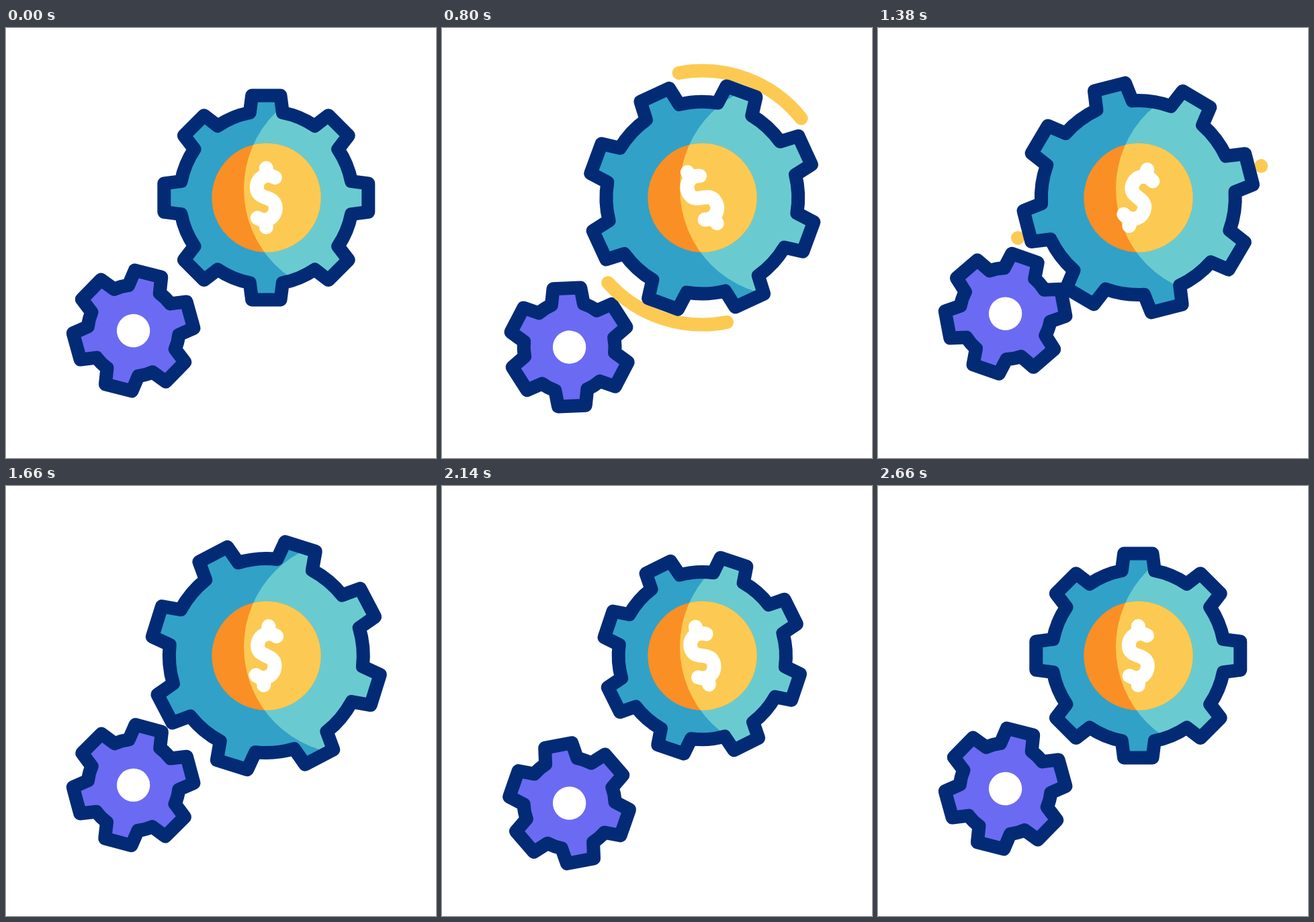
Recreate the animation shown at these times as an HTML page with a canvas. Size 640 by 640 pixels, loop 3 s.

```html
<!DOCTYPE html>
<html lang="en">
<head>
<meta charset="utf-8">
<title>Gears</title>
<style>
  html, body { margin: 0; width: 100%; height: 100%; overflow: hidden; background: #fff; }
  canvas { display: block; width: 640px; height: 640px; }
</style>
</head>
<body>
<canvas id="stage" width="640" height="640"></canvas>
<script>
const ctx = document.getElementById('stage').getContext('2d');
const LOOP = 3000;
const TAU = Math.PI * 2;
const rad = deg => deg * Math.PI / 180;

const NAVY = '#032b75', TEAL = '#31a1c8', AQUA = '#69cbd0';
const ORANGE = '#fa8f25', YELLOW = '#fcca52', PURPLE = '#6b6af3';

const HUB = { x: 387.3, y: 252.6 };
const SMALL_X = 189.6;
const STROKE = 20;

// Bezier easing with control points (x1, 0) and (x2, 1).
function ease(p, x1 = 1 / 3, x2 = 2 / 3) {
  let lo = 0, hi = 1, s = p;
  for (let i = 0; i < 24; i++) {
    const q = 1 - s;
    const x = 3 * q * q * s * x1 + 3 * q * s * s * x2 + s * s * s;
    if (x < p) lo = s; else hi = s;
    s = (lo + hi) / 2;
  }
  return s * s * (3 - 2 * s);
}

// Each key is [time, value, x1, x2]; the curve leads into that key.
function track(keys, t) {
  if (t <= keys[0][0]) return keys[0][1];
  for (let i = 1; i < keys.length; i++) {
    const [t0, v0] = keys[i - 1];
    const [t1, v1, x1, x2] = keys[i];
    if (t < t1) return v0 + (v1 - v0) * ease((t - t0) / (t1 - t0), x1, x2);
  }
  return keys[keys.length - 1][1];
}

const motion = {
  bigTurn: [[200, 0], [1200, 90, 0.42, 0.5], [2000, -30, 0.36, 0.66], [2660, 0]],
  bigScale: [[200, 1], [950, 1.12], [1660, 1.12], [2050, 0.952], [2300, 1]],
  smallTurn: [[200, 0], [1250, -120, 0.5, 0.5], [2175, 35, 0.5, 0.5], [2660, 0]],
  smallY: [[200, 450.5], [800, 475], [1400, 425], [2000, 475], [2660, 450.5]],
  sign: [[200, 0], [800, -30], [1400, 18], [2000, -15], [2660, 0]],
  lineStart: [[600, 0], [1400, 1]],
  lineEnd: [[200, 0], [1000, 1]]
};

// Speed lines around the big gear, in degrees.
const speedLines = [{ from: 0, span: 86 }, { from: 180, span: 90 }];

function gearPath({ teeth, tip, body, tipHalf, baseHalf }) {
  const path = new Path2D();
  const step = TAU / teeth;
  const inset = Math.asin(baseHalf / body);
  const baseY = Math.sqrt(body * body - baseHalf * baseHalf);
  for (let i = 0; i < teeth; i++) {
    const a = i * step;
    const put = (x, y) => path.lineTo(
      x * Math.cos(a) + y * Math.sin(a),
      x * Math.sin(a) - y * Math.cos(a));
    put(-baseHalf, baseY);
    put(-tipHalf, tip);
    put(tipHalf, tip);
    put(baseHalf, baseY);
    const from = a - Math.PI / 2;
    path.arc(0, 0, body, from + inset, from + step - inset);
  }
  path.closePath();
  return path;
}

const bigGear = gearPath({ teeth: 8, tip: 152, body: 129, tipHalf: 21.2, baseHalf: 24.5 });
const smallGear = gearPath({ teeth: 6, tip: 87.6, body: 67.9, tipHalf: 20.4, baseHalf: 24 });

const disc = (x, y, r) => {
  const path = new Path2D();
  path.arc(x, y, r, 0, TAU);
  return path;
};
const lightSide = disc(514, 239.5, 160);
const coin = disc(387.5, 252.6, 81.2);
const hole = disc(0, 0, 24.7);
const dollar = new Path2D(
  'M13-30C1-38-14-30-14-15.5C-14 5.5 14-5.5 14 15.5C14 30-1 38-13 30' +
  'M0-44V-33M0 44V33');

function stroke(path, color, width = STROKE) {
  ctx.strokeStyle = color;
  ctx.lineWidth = width;
  ctx.stroke(path);
}

function fill(path, color) {
  ctx.fillStyle = color;
  ctx.fill(path);
}

function placed(x, y, turn, paint) {
  ctx.save();
  ctx.translate(x, y);
  ctx.rotate(rad(turn));
  paint();
  ctx.restore();
}

function twoTone(shape, dark, light) {
  fill(shape, dark);
  ctx.save();
  ctx.clip(shape);
  fill(lightSide, light);
  ctx.restore();
}

function drawSpeedLines(turn, start, end) {
  if (end <= start) return;
  for (const { from, span } of speedLines) {
    const line = new Path2D();
    const angle = part => rad(turn + from + span * part);
    line.arc(HUB.x, HUB.y, 188.9, angle(start), angle(end));
    stroke(line, YELLOW);
  }
}

function drawBigGear(turn, scale) {
  const shape = new Path2D();
  shape.addPath(bigGear, new DOMMatrix()
    .translate(HUB.x, HUB.y).rotate(turn).scale(scale));
  twoTone(shape, TEAL, AQUA);
  stroke(shape, NAVY);
}

function draw(t) {
  const at = name => track(motion[name], t);
  const turn = at('bigTurn');

  ctx.fillStyle = '#fff';
  ctx.fillRect(0, 0, 640, 640);
  ctx.lineCap = ctx.lineJoin = 'round';

  placed(SMALL_X, at('smallY'), 14.5 + at('smallTurn'), () => {
    fill(smallGear, PURPLE);
    stroke(smallGear, NAVY);
    fill(hole, '#fff');
  });
  drawSpeedLines(turn, at('lineStart'), at('lineEnd'));
  drawBigGear(turn, at('bigScale'));
  twoTone(coin, ORANGE, YELLOW);
  placed(HUB.x, HUB.y, at('sign'), () => stroke(dollar, '#fff', 21));
}

const begin = performance.now();
function tick() {
  draw((performance.now() - begin) % LOOP);
  requestAnimationFrame(tick);
}
tick();
</script>
</body>
</html>
```
